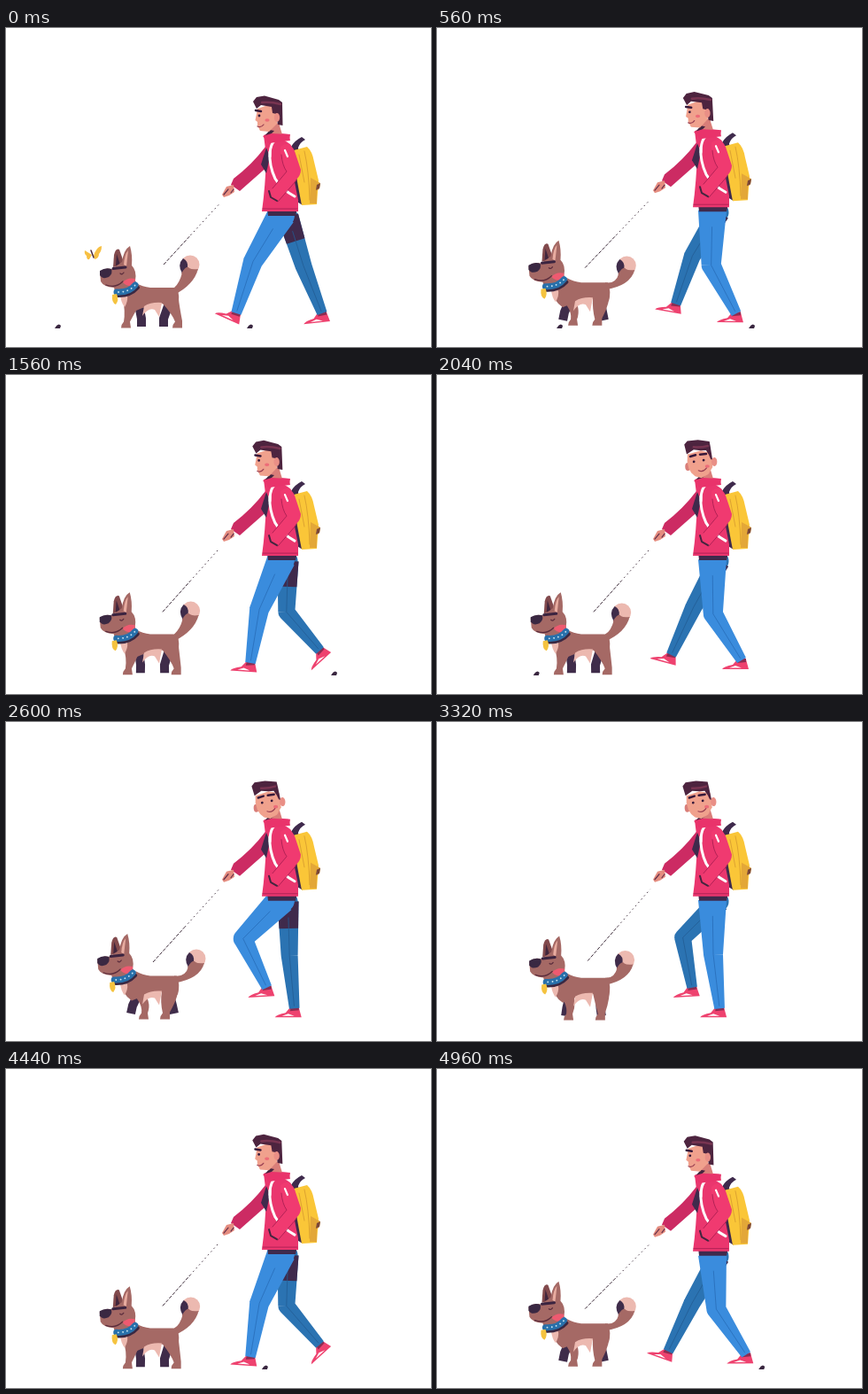
Write an HTML page that moves like this. It is 480 by 360 pixels and loops after 5000 ms.

```html
<!DOCTYPE html>
<html lang="en">
<head>
<meta charset="utf-8">
<title>Walking the dog</title>
<style>
html, body { margin: 0; width: 100%; height: 100%; overflow: hidden; background: #fff; }
svg { display: block; width: 100vw; height: 100vh; }
.line { fill: none; stroke-linecap: round; stroke-linejoin: round; }
.cut { fill: none; stroke-linejoin: round; }
</style>
</head>
<body>
<svg viewBox="0 0 480 360">
  <g id="pebbles" fill="#3a2740"></g>

  <g id="butterfly">
    <g id="wings" fill="#f7c043">
      <path d="M-1 2L-9-3Q-10 1-7 3Q-7 8-4 7Z"/>
      <path d="M1 3Q4-7 10-8Q10-2 7 1Q7 6 2 7Z"/>
    </g>
    <path class="line" d="M-2-3L1 5" stroke="#4a2a3c" stroke-width="1.5"/>
  </g>

  <g id="dog">
    <path id="farFront" class="cut" stroke="#3f2c4a" stroke-width="10"/>
    <path id="farHind" class="cut" stroke="#3f2c4a" stroke-width="10"/>
    <path id="tail" fill="#a56965"/>
    <g id="tailTip">
      <circle r="10.5" fill="#ecb9b0"/>
      <path d="M-8-7Q-2-4-3 3L-9 10Q-15 0-8-7Z" fill="#3f2c4a"/>
      <path d="M-10 10Q-4 0-1 4Q2 6 9 5Q6 11-2 16Z" fill="#a56965"/>
    </g>
    <path id="nearHind" fill="#a56965"/>
    <path id="nearFront" fill="#a56965"/>
    <g id="dogBody">
      <path d="M128 296L147 288Q154 292 163 293L193 293Q197 303 194 314Q187 317 177 311L154 316L142 321Q131 314 128 296Z" fill="#a56965"/>
      <path d="M129 302L137 302Q138 308 134 315Q130 310 129 302Z" fill="#ecb9b0"/>
      <path d="M156 314Q164 309 176 310L173 326L168 318Q161 315 154 325Z" fill="#ecb9b0"/>
    </g>
    <g id="dogHead">
      <path d="M121 270L122 256Q124 248 128 250L134 267Z" fill="#824a4d"/>
      <path d="M124 268L125 255L129 267Z" fill="#41263d"/>
      <path d="M106 275Q112 270 120 272L131 264Q133 250 140 246Q143 256 142 268Q148 274 146 285L148 290L124 300L122 293Q110 292 107 286Z" fill="#a56965"/>
      <path d="M133 267Q134 255 138 251Q137 260 136 269Z" fill="#e8aca0"/>
      <path d="M106 274Q112 270 119 272Q121 277 116 281Q109 284 106 279Z" fill="#3a2842"/>
      <path class="line" d="M113 290Q124 294 132 286M129 277Q131 279 133 276" stroke="#5b2d3d" stroke-width="1.3"/>
      <path class="line" d="M121 271.5L135 270" stroke="#3b2440" stroke-width="3"/>
      <path d="M132 287Q137 281 146 283L145 290Q137 293 132 287Z" fill="#ee5a70"/>
      <path class="line" d="M125 302Q140 303 149 293" stroke="#3a2842" stroke-width="4"/>
      <path class="line" d="M125 298Q139 299 146 290" stroke="#2870aa" stroke-width="7"/>
      <path class="line" d="M127 298Q139 298 146 290" stroke="#c9e4f2" stroke-width="1.8" stroke-dasharray=".1 5"/>
      <path d="M120 301L125 300Q128 307 124 312Q119 310 120 301Z" fill="#f5c33f"/>
    </g>
  </g>

  <g class="cut" stroke="#3d2c3a">
    <path id="leashLow" stroke-dasharray="4 1.6"/>
    <path id="leashTop" stroke-dasharray="1.5 3.5"/>
  </g>

  <g id="farFoot"></g>
  <path id="farLeg" fill="#2b73b2"/>
  <path id="shade" fill="#3f2a4c"/>
  <path id="farSeam" class="line" stroke="#225c94" stroke-width=".8"/>
  <g id="nearFoot"></g>
  <path id="nearLeg" fill="#3a8cdd"/>
  <path id="nearSeam" class="line" stroke="#276db8" stroke-width=".8"/>

  <g id="upper">
    <path d="M295 203H329L327 212H296Z" fill="#3f2a4c"/>
    <path d="M322 134Q326 127 334 123L338 126Q332 129 330 135L335 200L327 195L320 170Z" fill="#3f2a4c"/>
    <path d="M325 138L340 134Q346 139 348 151L353 172L351 199L334 200Q331 185 327 162Z" fill="#fac638"/>
    <path d="M344 169L355 175L354 181L351 184V198L343 198Z" fill="#e3a738"/>
    <path d="M351 177L355 175L354 181L350 183Z" fill="#7a4637"/>
    <path class="line" d="M337 139Q342 160 343 194M331 143L337 174" stroke="#dda331" stroke-width="1"/>
    <path d="M293 134L298 154L264 184L254 177L257 170Q278 154 293 134Z" fill="#cc2b63"/>
    <path d="M257 177L258 185L252 189L246 191L244 188L249 179Z" fill="#e58d80"/>
    <path class="line" d="M246 188L251 182M254 186L257 182" stroke="#65314a" stroke-width="1.2"/>
    <path d="M291 121L298 118L321 120L320 128L325 140L331 160L326 174L330 194V207H289Q293 178 294 145Z" fill="#ea366e"/>
    <path d="M294 135L298 145L294 164L288 154Z" fill="#3f2a4c"/>
    <path class="line" d="M298 140Q297 155 304 170Q311 182 326 190" stroke="#fff" stroke-width="3"/>
    <path d="M310 134Q320 126 326 139L333 160Q333 166 328 171L307 196L299 193Q296 186 300 182L316 162Q309 147 310 134Z" fill="#f03a70"/>
    <path class="line" d="M322 130Q308 119 301 130Q298 135 298 145" stroke="#fff" stroke-width="3"/>
    <path class="line" d="M311 143Q312 155 317 162L301 181M307 196L328 172M290 204L329 204M299 126L316 123" stroke="#ab1f53" stroke-width=".9"/>
    <path class="line" d="M297 184L299 191L306 195" stroke="#43253f" stroke-width="2"/>
    <path class="line" d="M315 138L318 145" stroke="#fff" stroke-width="2.2"/>
    <path d="M297 110L308 107L312 120L299 121Z" fill="#d97e79"/>
    <path d="M298 115L303 116L297 122L292 122Z" fill="#43253f"/>
    <path d="M290 122L300 119L319 120L321 127L297 130Z" fill="#e9336b"/>
    <g id="head">
      <ellipse id="earL" fill="#d97e79"/>
      <path id="face" fill="#f0a18d"/>
      <path id="hair" fill="#4d243f"/>
      <path id="sheen" class="line" stroke="#783451" stroke-width="2.5"/>
      <ellipse id="earR" fill="#e98f86"/>
      <ellipse id="cheek" rx="2.6" ry="1.8" fill="#ed6c78"/>
      <path id="brows" class="line" stroke="#35183a" stroke-width="2.5"/>
      <circle id="eyeL" r="1.4" fill="#35183a"/>
      <circle id="eyeR" fill="#35183a"/>
      <path id="mouth" class="line" stroke="#973d51" stroke-width="1.2"/>
    </g>
  </g>
</svg>
<script>
const LOOP = 5000, STEP = 40, STRIDE = 1440, TROT = 400, GROUND = 0.143;
const TAU = 2 * Math.PI;
const $ = id => document.getElementById(id);
const set = (id, attrs) => { for (const k in attrs) $(id).setAttribute(k, attrs[k]); };
const mix = (a, b, k) => a + (b - a) * k;
const mixAll = (a, b, k) => a.map((v, i) => mix(v, b[i], k));
const shift = (id, x, y) => set(id, { transform: `translate(${x} ${y})` });
const ease = (t, from, to) => {
  const k = Math.min(1, Math.max(0, (t - from) / (to - from)));
  return k * k * (3 - 2 * k);
};

// One stride of a foot, in twelve even steps from heel strike
const ankleX = [260, 276, 292, 308, 325, 344, 357, 358, 338, 307, 289, 268];
const ankleY = [322, 325, 325, 324, 323, 322, 322, 311, 300, 298, 302, 316];
const footTilt = [24, 4, 0, 0, 0, 0, -6, -42, -48, -13, 0, 15];

function loopCurve(keys, phase) {
  const n = keys.length, u = ((phase % 1) + 1) % 1 * n, i = Math.floor(u), f = u - i;
  const [a, b, c, d] = [-1, 0, 1, 2].map(o => keys[(i + o + n) % n]);
  return b + f / 2 * (c - a + f * (2 * a - 5 * b + 4 * c - d + f * (3 * (b - c) + d - a)));
}

function taper([ax, ay], [bx, by], wa, wb) {
  const len = Math.hypot(bx - ax, by - ay) || 1;
  const nx = (ay - by) / len, ny = (bx - ax) / len;
  return `M${ax + nx * wa} ${ay + ny * wa}L${bx + nx * wb} ${by + ny * wb}` +
    `L${bx - nx * wb} ${by - ny * wb}L${ax - nx * wa} ${ay - ny * wa}Z`;
}
const disc = ([x, y], r) => `M${x - r} ${y}a${r} ${r} 0 1 0 ${2 * r} 0a${r} ${r} 0 1 0 ${-2 * r} 0Z`;

function kneeOf([hx, hy], [ax, ay], bone) {
  const dx = ax - hx, dy = ay - hy, d = Math.hypot(dx, dy);
  const h = Math.sqrt(Math.max(4, bone * bone - d * d / 4));
  return [hx + dx / 2 - dy / d * h, hy + dy / 2 + dx / d * h];
}

function drawLeg(name, phase, hip, leg) {
  const sway = leg.sway * Math.sin(TAU * phase);
  const ankle = [loopCurve(ankleX, phase) + sway, loopCurve(ankleY, phase)];
  const knee = kneeOf(hip, ankle, leg.bone);
  set(name + 'Leg', { d: disc(hip, leg.hip - 1) + taper(hip, knee, leg.hip, leg.knee) +
    disc(knee, leg.knee) + taper(knee, ankle, leg.knee, 5.8) });
  set(name + 'Seam', { d: `M${mixAll(hip, knee, .3)}L${knee}L${mixAll(knee, ankle, .95)}` });
  set(name + 'Foot', { transform: `translate(${ankle}) rotate(${loopCurve(footTilt, phase)})` });
  return knee;
}
const nearShape = { bone: 61.5, hip: 16, knee: 11, sway: 0 };
const farShape = { bone: 57.5, hip: 12, knee: 9.5, sway: 7 };

function drawHead(k, bob) {
  const m = (a, b) => mix(a, b, k);
  const poly = (a, b) => 'M' + mixAll(a, b, k).join(' ') + 'Z';
  set('head', { transform: `rotate(${bob * .4} 303 118) translate(${2.5 * k} 0)` });
  set('face', { d: poly(
    [284,91, 283,97, 281.5,104, 284,106, 284,110, 287,116, 297,117, 306,108, 308,92, 296,87],
    [281,92, 280.5,100, 282,108, 285,113, 289,117, 296,119, 304,115, 309,107, 308,91, 296,88]) });
  set('hair', { d: poly(
    [279,83, 283,78, 292,76.5, 308,81, 312,84, 312.5,110, 307,109, 305,97, 301,96, 300,89, 288,87, 283,91],
    [277.5,81, 281,77, 293,76, 306,78, 307,84, 309,99, 307,98, 305,93, 302,88, 296,88, 288,87, 280,92]) });
  set('sheen', { d: `M${m(289, 288)} 84Q${m(299, 296)} ${m(83, 85)} ${m(310, 304)} ${m(86, 83)}` });
  set('earL', { cx: m(286, 281), cy: 106, rx: 3 * k, ry: 4.5 * k });
  set('earR', { cx: m(306, 311), cy: 101, rx: 3.2, ry: 5 });
  set('cheek', { cx: m(295, 303), cy: m(104, 106) });
  set('brows', { d: `M${m(282, 284)} ${m(93, 94.5)}L${m(288, 290)} ${m(94, 93)}` +
    (k > .3 ? `M${m(289, 295)} 92.5L${m(290, 302)} ${m(93, 92)}` : '') });
  set('eyeL', { cx: m(286, 288), cy: m(99, 100.5) });
  set('eyeR', { cx: m(290, 299), cy: 99, r: 1.4 * ease(k, .3, .8) });
  set('mouth', { d: `M${m(284, 293)} ${m(111, 110.5)}Q${m(288, 298)} 113 ${m(291, 302)} ${m(109, 108)}` });
}

function drawMan(t) {
  const phase = t / STRIDE;
  const bob = -5.8 * (1 - Math.cos(2 * TAU * phase));
  const hipN = [311, 211 + bob], hipF = [318.5, 213 + bob];
  const near = drawLeg('near', phase, hipN, nearShape);
  const far = drawLeg('far', phase + .5, hipF, farShape);
  const reach = mix(.2, .5, ease(far[0] - near[0], -25, 25));
  set('shade', { d: taper(hipF, mixAll(hipF, far, reach), 12, 12 - 2.5 * reach) });
  shift('upper', 0, bob);
  drawHead(ease(t, 1600, 1900) - ease(t, 3420, 3720), bob);
  return bob;
}

function drawDog(t) {
  const c = Math.cos(TAU * t / TROT), up = 1 - c;
  const body = -3.2 * up;
  shift('dogBody', 0, body);
  shift('dogHead', -1.4 * up, -3.5 * up);

  const tx = 211.5 - 3.5 * c, ty = 267 + 1.5 * Math.sin(TAU * t / TROT);
  shift('tailTip', tx, ty);
  set('tail', { d: `M190 ${293 + body}Q${tx - 12} ${ty + 21} ${tx - 9} ${ty + 9}L${tx + 9} ${ty + 5}Q${tx + 4} ${ty + 23} 190 ${301 + body}Z` });

  const paw = (x, y) => `L${x + 5} ${y}H${x - 6}Q${x - 6} ${y - 4} ${x - 3} ${y - 7}`;
  const ny = 338.5 - 1.5 * up, fx = 146 - 10 * c, hx = 187 + 7 * c;
  set('nearFront', { d: `M153 ${308 + body}Q${fx + 9} ${322 + body} ${fx + 4} ${ny - 7}${paw(fx, ny)}Q${fx - 1} ${320 + body} 132 ${305 + body}Z` });
  set('nearHind', { d: `M194.5 ${303 + body}Q196 ${315 + body} ${hx + 5} ${ny - 8}${paw(hx, ny)}Q${hx - 6} ${323 + body} 176 ${310 + body}Z` });

  const fy = 337 - 4 * up;
  set('farFront', { d: `M150 ${312 + body}L${148 + 5 * c} ${fy - 9}L${147 + 6 * c} ${fy}` });
  set('farHind', { d: `M184 ${311 + body}L${183 - 5 * c} ${fy - 9}L${184 - 6 * c} ${fy}` });
  return c;
}

function drawLeash(bob, c) {
  const hand = [246, 193 + bob], end = [172 + 6 * c, 269 - 2 * c];
  const split = mixAll(end, hand, .45);
  set('leashLow', { d: `M${end}L${split}` });
  set('leashTop', { d: `M${split}L${mixAll(end, hand, .93)}` });
}

function drawButterfly(t) {
  const flap = .75 + .25 * Math.cos(TAU * t / 240);
  shift('butterfly', 98 - .19 * t, 254 - .03 * t + 5 * Math.sin(t / 90));
  set('wings', { transform: `scale(${flap} 1)` });
}

// Each pebble: place at time zero, first and last moment in view
const pebbles = [[276, 0, 1100], [59, 0, 600], [148, 700, 1700], [-37, 900, 1400], [-179, 1880, 2400], [-342, 4200, 5000]];
$('pebbles').innerHTML = pebbles.map(() => '<path d="M-4 2L-2-1Q1-4 3-1L2 2Z"/>').join('');
const stones = [...$('pebbles').children];
function drawPebbles(t) {
  pebbles.forEach(([x, from, to], i) => {
    stones[i].setAttribute('transform', `translate(${x + GROUND * t} 337)`);
    stones[i].style.display = t >= from && t < to ? '' : 'none';
  });
}

const shoe = '<path d="M-5-1H5L8 10H-22Q-20 7-10 5Z" fill="#ee426f"/>' +
  '<path d="M-4-2H5L5 2L-5 3Z" fill="#8c2c50"/>' +
  '<path d="M-14 8.5L-7 6L0 8.5Z" fill="#fff"/>';
$('farFoot').innerHTML = $('nearFoot').innerHTML = shoe;

function frame() {
  const t = Math.floor(performance.now() % LOOP / STEP) * STEP;
  drawPebbles(t);
  drawButterfly(t);
  drawLeash(drawMan(t), drawDog(t));
  requestAnimationFrame(frame);
}
frame();
</script>
</body>
</html>
```
